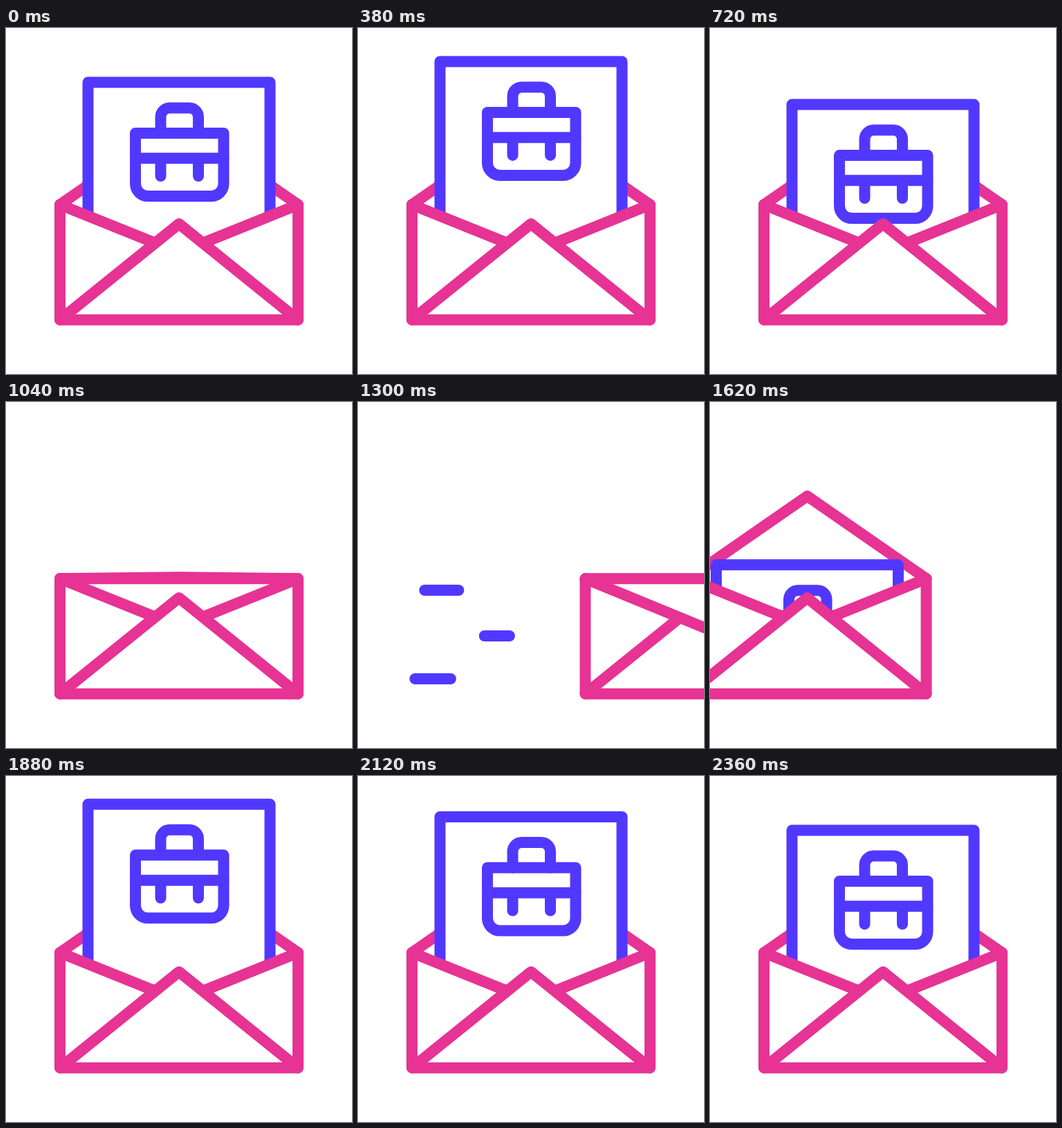
These frames come from a looping animation (500x500 px, 2700 ms). An HTML page:

```html
<!DOCTYPE html>
<html lang="en">
<head>
<meta charset="utf-8">
<title>Job letter</title>
<style>
  html, body { margin: 0; width: 100%; height: 100%; overflow: hidden; background: #fff; }
  svg { display: block; width: 100vw; height: 100vh; }
  path { stroke-width: 16; stroke-linecap: round; stroke-linejoin: round; fill: none; }
  .pink { stroke: #e63394; }
  .blue { stroke: #5138ff; }
  .paper { fill: #fff; }
</style>
</head>
<body>
<svg viewBox="0 0 500 500">
  <defs>
    <clipPath id="pocket"><rect x="80" y="-50" width="340" height="440"/></clipPath>
  </defs>
  <path id="streaks" class="blue"/>
  <g id="mail">
    <path id="back" class="pink paper"/>
    <g clip-path="url(#pocket)">
      <g id="letter" class="blue">
        <path class="paper" d="M118.5 420V78.5H381.5V420"/>
        <path d="M223.5 152V128.5a13 13 0 0 1 13-13H265a13 13 0 0 1 13 13V152"/>
        <path d="M187 152H314.5V225a18 18 0 0 1-18 18H205a18 18 0 0 1-18-18Z"/>
        <path d="M187 188.3H314.5M223.5 188.3V214M278 188.3V214"/>
      </g>
    </g>
    <path class="paper" d="M78 255L215 310L250 283L285 310L422 255V422H78Z"/>
    <g class="pink">
      <path d="M78 255.3V421.7H422V255.3"/>
      <path d="M78 255.3L215 310.5M422 255.3L285 310.5"/>
      <path d="M78 421.7L250 283L422 421.7"/>
    </g>
    <path id="front" class="pink paper"/>
  </g>
</svg>
<script>
const LOOP = 2700;
const HINGE = 255.3;
const $ = id => document.getElementById(id);
const [mail, letter, back, front, streaks] =
  ['mail', 'letter', 'back', 'front', 'streaks'].map($);

const mix = (a, b, k) => a + (b - a) * k;

// Eased progress from time a to time b
function ease(t, a, b) {
  const k = Math.min(1, Math.max(0, (t - a) / (b - a)));
  return k * k * (3 - 2 * k);
}

// Value at t through [time, value] keys, eased between neighbours
function track(t, keys) {
  let v = keys[0][1];
  for (let i = 1; i < keys.length; i++) {
    const [a, from] = keys[i - 1], [b, to] = keys[i];
    if (t >= a) v = mix(from, to, ease(t, a, b));
  }
  return v;
}

const letterKeys = [[0, 0], [540, -38], [1092, 240], [1468, 240], [1890, -38], [2360, 0]];
const EXIT = 1140, SWAP = 1430, ARRIVE = 1715;

// Each streak: y, left end, right end
const streakList = [[272, 75, 155], [338, 167, 226], [400, 60, 144]];

function draw(t) {
  const gone = t >= SWAP;
  const x = gone ? mix(-430, 0, ease(t, SWAP, ARRIVE)) : mix(0, 430, ease(t, EXIT, SWAP));
  mail.setAttribute('transform', `translate(${x} 0)`);
  letter.setAttribute('transform', `translate(0 ${track(t, letterKeys)})`);

  const tip = gone ? 136 : mix(136, 326, ease(t, 902, 1142));
  const flap = y => `M78 ${HINGE}L250 ${y}L422 ${HINGE}`;
  back.setAttribute('d', tip < HINGE ? flap(tip) : '');
  front.setAttribute('d', tip > 245 ? flap(Math.max(tip, HINGE)) + 'Z' : '');

  const head = ease(t, 1160, 1340), tail = ease(t, 1240, 1420);
  streaks.setAttribute('d', head > tail
    ? streakList.map(([y, a, b]) => `M${mix(a, b, tail)} ${y}H${mix(a, b, head)}`).join('')
    : '');
}

const start = performance.now();
function tick() {
  draw((performance.now() - start) % LOOP);
  requestAnimationFrame(tick);
}
tick();
</script>
</body>
</html>
```
